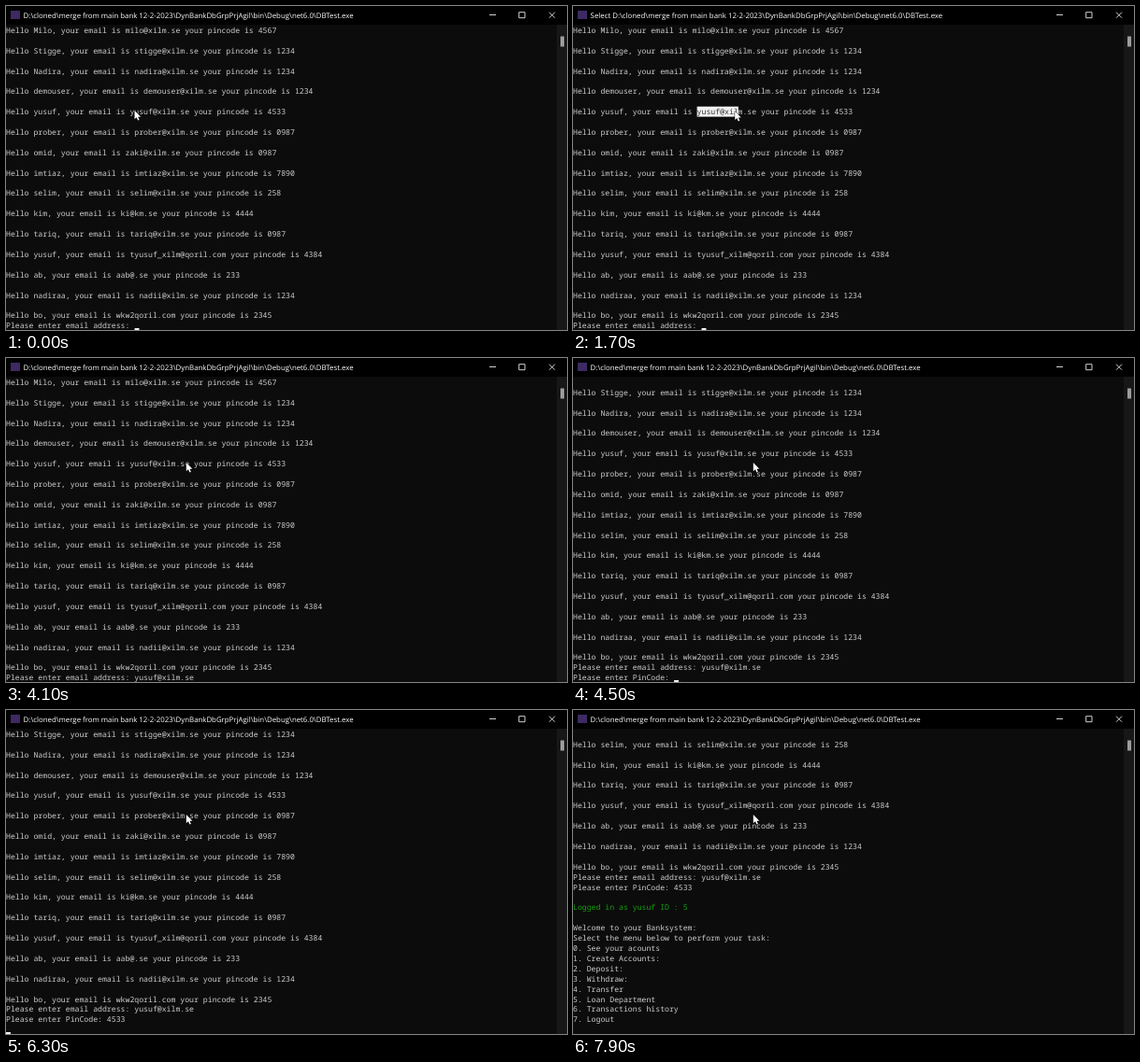
Write an HTML page with a canvas that moves like this. It is 600 px wide and 347 px high and loops after 8 s.

```html
<!DOCTYPE html>
<html lang="en">
<head>
<meta charset="utf-8">
<title>Console</title>
<style>
  html, body { margin: 0; width: 100%; height: 100%; overflow: hidden; background: #0c0c0c; }
  canvas { display: block; }
</style>
</head>
<body>
<canvas id="stage" width="600" height="347"></canvas>
<script>
const ctx = document.getElementById('stage').getContext('2d');
const LOOP = 8000, STEP = 100;
const CELL = 4.912, ROW = 10.91, TOP = 20.4, BASE = 8.5, ROWS = 30;
const MONO = '8.187px "Noto Sans Mono", monospace';
const SANS = '7.845px "Open Sans", sans-serif';
const PATH = 'D:\\cloned\\merge from main bank 12-2-2023\\DynBankDbGrpPrjAgil\\bin\\Debug\\net6.0\\DBTest.exe';

const users = `Milo milo@xilm.se 4567
Stigge stigge@xilm.se 1234
Nadira nadira@xilm.se 1234
demouser demouser@xilm.se 1234
yusuf yusuf@xilm.se 4533
prober prober@xilm.se 0987
omid zaki@xilm.se 0987
imtiaz imtiaz@xilm.se 7890
selim selim@xilm.se 258
kim ki@km.se 4444
tariq tariq@xilm.se 0987
yusuf tyusuf_xilm@qoril.com 4384
ab aab@.se 233
nadiraa nadii@xilm.se 1234
bo wkw2qoril.com 2345`.split('\n').map(u => u.split(' '));

const list = users.flatMap(([name, mail, pin]) =>
  [`Hello ${name}, your email is ${mail} your pincode is ${pin}`, '']).slice(0, -1);

const menu = ['Welcome to your Banksystem:', 'Select the menu below to perform your task:',
  ...['See your acounts', 'Create Accounts:', 'Deposit:', 'Withdraw:', 'Transfer',
    'Loan Department', 'Transactions history', 'Logout'].map((s, i) => `${i}. ${s}`)];

const LOGIN = 'Logged in as yusuf ID : 5';
const SELECT_ROW = 8, SELECT_COL = 27;
const blinks = [400, 900, 2000, 2600, 3100, 3400, 4100, 4500, 5900, 6300, 7900];
// time, x, y of the pointer tip
const pointer = [[100, 137.5, 112], [200, 135, 112], [700, 135, 112], [1200, 152, 112.6],
  [1400, 152, 112.6], [1700, 173.2, 112.8], [1800, 173.2, 112.8], [2100, 192.8, 112]];

function pointerAt(t) {
  const i = pointer.findIndex(p => p[0] > t);
  if (i === 0) return pointer[0].slice(1);
  if (i < 0) return pointer[pointer.length - 1].slice(1);
  const a = pointer[i - 1], b = pointer[i], k = (t - a[0]) / (b[0] - a[0]);
  return [a[1] + (b[1] - a[1]) * k, a[2] + (b[2] - a[2]) * k];
}

function linesAt(t) {
  const lines = [...list, 'Please enter email address: ' + (t >= 3900 ? users[4][1] : '')];
  if (t >= 4500) {
    const typed = Math.max(0, Math.floor((t - 4900) / 200));
    lines.push('Please enter PinCode: ' + users[4][2].slice(0, typed));
  }
  if (t >= 6300) lines.push('');
  if (t >= 6600) lines.push(LOGIN, '', '');
  if (t >= 6700) lines.splice(-1, 1, ...menu, '');
  return lines.slice(-ROWS);
}

function rect(x, y, w, h, color) {
  ctx.fillStyle = color;
  ctx.fillRect(x, y, w, h);
}

function write(s, x, y, color, font = MONO) {
  ctx.font = font;
  ctx.fillStyle = color;
  ctx.fillText(s, x, y);
}

function drawWindow(selecting) {
  rect(0, 0, 600, 347, '#0c0c0c');
  rect(0, 0, 600, 20, '#000');
  rect(589, 20, 11, 327, '#171717');
  rect(593, 32.5, 4, 11, '#9c9c9c');
  rect(5, 5, 10, 9, '#3d2a63');
  write((selecting ? 'Select ' : '') + PATH, 18.6, 13, '#fff', SANS);
  ctx.strokeStyle = '#e8e8e8';
  ctx.lineWidth = 0.9;
  ctx.stroke(new Path2D('M517 9.5h7M548.7 6.7h6.3v6h-6.3zM581 6.7l6 6M587 6.7l-6 6'));
}

function drawPointer(x, y) {
  const arrow = new Path2D('M0 0V9.2L2.1 7.3L3.6 10.6L5.1 9.9L3.7 6.7H6.6Z');
  ctx.save();
  ctx.translate(x, y);
  ctx.strokeStyle = '#000';
  ctx.lineWidth = 1;
  ctx.stroke(arrow);
  ctx.fillStyle = '#fff';
  ctx.fill(arrow);
  ctx.restore();
}

function draw(t) {
  const selecting = t >= 800 && t < 3400;
  const lines = linesAt(t);
  const [x, y] = pointerAt(t);
  ctx.textRendering = 'geometricPrecision';
  drawWindow(selecting);
  lines.forEach((s, i) => write(s, 0, TOP + i * ROW + BASE, s === LOGIN ? '#13a10e' : '#ccc'));

  if (selecting) {
    const end = Math.floor(x / CELL) + 1, left = SELECT_COL * CELL, top = TOP + SELECT_ROW * ROW;
    rect(left, top, (end - SELECT_COL) * CELL, ROW, '#f2f2f2');
    write(lines[SELECT_ROW].slice(SELECT_COL, end), left, top + BASE, '#333');
  }
  if (blinks.filter(b => b <= t).length % 2 === 0) {
    rect(lines[ROWS - 1].length * CELL, 345, CELL, 2, '#f2f2f2');
  }
  drawPointer(x, y);
}

let start;
function tick(now) {
  start ??= now;
  const t = (now - start) % LOOP;
  draw(Math.floor(t / STEP) * STEP);
  requestAnimationFrame(tick);
}
draw(0);
requestAnimationFrame(tick);
</script>
</body>
</html>
```
